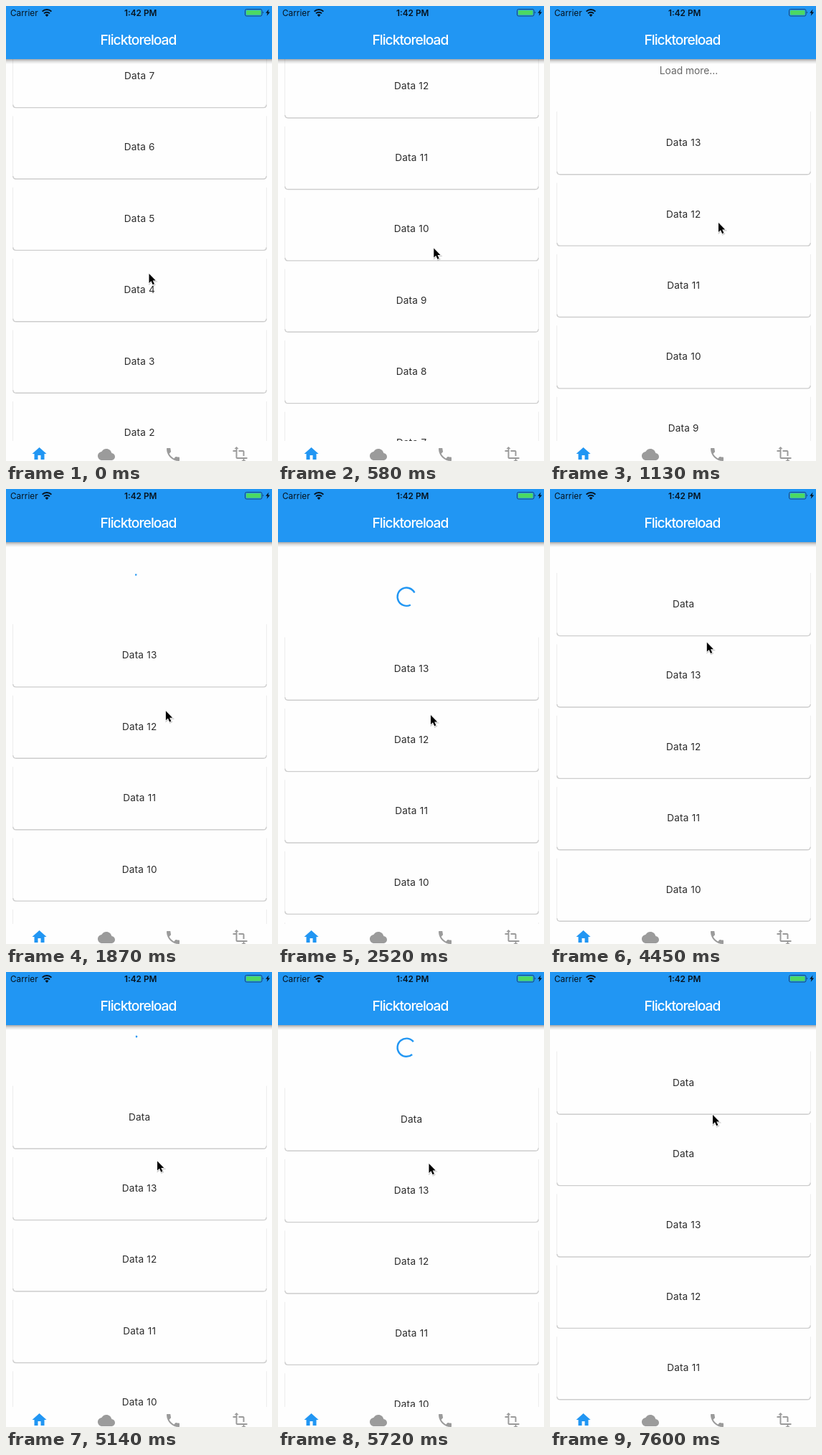
Write an HTML page that moves like this. It is 371 px wide and 634 px high and loops after 7.99 s.

```html
<!DOCTYPE html>
<html lang="en">
<head>
<meta charset="utf-8">
<title>List refresh</title>
<style>
  html, body { margin: 0; width: 100%; height: 100%; overflow: hidden; background: #fefefe; }
  svg { display: block; width: 100%; height: 100%; }
  text { font-family: Inter, Roboto, sans-serif; text-anchor: middle; }
  .row { font-size: 13.6px; letter-spacing: .2px; fill: #2c2c2c; }
  .side, .base { fill: none; stroke: #ececec; }
  .base { stroke: #cdcdcd; stroke-width: 1.4; }
</style>
</head>
<body>
<svg viewBox="0 0 371 634" xmlns="http://www.w3.org/2000/svg">
  <defs>
    <linearGradient id="shade" x2="0" y2="1">
      <stop offset="0" stop-color="#000" stop-opacity=".34"/>
      <stop offset=".45" stop-color="#000" stop-opacity=".13"/>
      <stop offset="1" stop-color="#000" stop-opacity="0"/>
    </linearGradient>
  </defs>
  <rect width="371" height="634" fill="#fefefe"/>
  <g id="list"></g>
  <text id="hint" x="193.5" font-size="13.8" fill="#666">Load more...</text>
  <path id="spinner" fill="none" stroke="#2196f3" stroke-width="2.4"/>

  <rect y="74" width="371" height="7" fill="url(#shade)"/>
  <rect width="371" height="74" fill="#2196f3"/>
  <text x="184.5" y="54" font-size="19.3" font-weight="500" letter-spacing="-1" fill="#fff">Flicktoreload</text>
  <g fill="#06131f">
    <text x="6" y="13.7" font-size="11.8" style="text-anchor:start">Carrier</text>
    <text x="187.7" y="13.7" font-size="11.8" font-weight="600">1:42 PM</text>
    <path d="M57 15l-2.4-2.6a3.4 3.4 0 0 1 4.8 0z"/>
    <path d="M53 10.4a5.6 5.6 0 0 1 8 0M50.6 7.6a9 9 0 0 1 12.8 0" fill="none" stroke="#06131f" stroke-width="2"/>
    <rect x="333.5" y="4.5" width="23.5" height="9.5" rx="2" fill="none" stroke="#1c4a70"/>
    <rect x="335" y="6" width="20.5" height="6.5" rx="1" fill="#4cd964"/>
    <path d="M358.5 7.5q1.5 1.5 0 3zM366.5 4.5l-4.3 5.3h2.5l-1 4 4.5-5.4h-2.6z"/>
  </g>

  <rect y="606" width="371" height="28" fill="#fefefe"/>
  <g fill="#9b9b9b">
    <path transform="translate(34.5 612)" fill="#2196f3" d="M10 20v-6h4v6h5v-8h3L12 3 2 12h3v8z"/>
    <path transform="translate(128 613)" d="M19.35 10.04C18.67 6.59 15.64 4 12 4 9.11 4 6.6 5.64 5.35 8.04 2.34 8.36 0 10.91 0 14c0 3.31 2.69 6 6 6h13c2.76 0 5-2.24 5-5 0-2.64-2.05-4.78-4.65-4.96z"/>
    <path transform="translate(221 613)" d="M6.62 10.79c1.44 2.83 3.76 5.14 6.59 6.59l2.2-2.2c.27-.27.67-.36 1.02-.24 1.12.37 2.33.57 3.57.57.55 0 1 .45 1 1V20c0 .55-.45 1-1 1-9.39 0-17-7.61-17-17 0-.55.45-1 1-1h3.5c.55 0 1 .45 1 1 0 1.25.2 2.45.57 3.57.11.35.03.74-.25 1.02z"/>
    <path transform="translate(314.5 613)" d="M22 18v-2H8V4h2L7 1 4 4h2v2H2v2h4v8c0 1.1.9 2 2 2h8v2h-2l3 3 3-3h-2v-2h4zM10 8h6v6h2V8c0-1.1-.9-2-2-2h-6v2z"/>
  </g>
  <g id="cursor">
    <path d="M0 0v13l3-2.7 2.2 5 2.2-1-2.2-4.7h4z" fill="none" stroke="#000" stroke-opacity=".2" stroke-width="2" transform="translate(.6 1)"/>
    <path d="M0 0v13l3-2.7 2.2 5 2.2-1-2.2-4.7h4z" stroke="#fff" stroke-width="1.4" paint-order="stroke"/>
  </g>
</svg>
<script>
const LOOP = 7990, PITCH = 99.4, CYCLE = 1333;
const STARTS = [1853, 5107], LOAD = 1510, CLOSE = 490, HEADER = 51;
const $ = id => document.getElementById(id);

// Smooth 0 to 1 between two times
function ramp(t, from, to) {
  const u = Math.min(1, Math.max(0, (t - from) / (to - from)));
  return u * u * (3 - 2 * u);
}

// Flick to the top, pull, spring back, second pull; the header closes after each load
function listTop(t) {
  const closed = STARTS.reduce((sum, s) => sum + ramp(t, s + LOAD, s + LOAD + CLOSE), 0);
  return -499.4 + 684 * ramp(t, 30, 850) + 65 * ramp(t, 850, 2420)
    - 45 * ramp(t, 2520, 3350) + HEADER * (ramp(t, 4210, 5300) - closed);
}

function pointer(t) {
  const a = ramp(t, 30, 1130), b = ramp(t, 1130, 2520), c = ramp(t, 2520, 3220);
  const d = ramp(t, 3220, 3880), e = ramp(t, 4210, 5300), f = ramp(t, 7400, 7600);
  return [
    199.5 + 35.5 * a - 22 * b - 6 * c + 13 * d - 9.5 * e + 16.5 * f,
    373 - 71 * a + 13 * b - 91 * c - 18 * d + 61 * e - 68 * f
  ];
}

// cubic-bezier(.4, 0, .2, 1)
function ease(x) {
  if (x <= 0) return 0;
  if (x >= 1) return 1;
  let lo = 0, hi = 1;
  for (let i = 0; i < 20; i++) {
    const s = (lo + hi) / 2, r = 1 - s;
    if (1.2 * r * r * s + .6 * r * s * s + s ** 3 < x) lo = s; else hi = s;
  }
  return lo * lo * (3 - 2 * lo);
}

function arc(age, cx, cy) {
  const step = Math.floor(age / CYCLE), p = age / CYCLE - step, r = 12.6;
  const head = ease(p * 2), tail = ease(p * 2 - 1);
  const a = Math.PI * (-.5 + 1.5 * tail + 1.7 * p - .8 * step);
  const sweep = Math.max(1.5 * Math.PI * (head - tail), .18);
  const at = k => `${cx + r * Math.cos(k)} ${cy + r * Math.sin(k)}`;
  return `M${at(a)}A${r} ${r} 0 ${sweep > Math.PI ? 1 : 0} 1 ${at(a + sweep)}`;
}

const rows = Array.from({ length: 15 }, () => {
  const g = document.createElementNS("http://www.w3.org/2000/svg", "g");
  g.innerHTML = `<path class="side" d="M9.6-43V41M363.4-43V41"/>
    <path class="base" d="M9.8 40.6q.2 4 4.2 4H359q4 0 4.2-4"/>
    <text class="row" x="186.2" y="5"></text>`;
  $("list").append(g);
  return { g, label: g.lastChild };
});

function draw(t) {
  const top = listTop(t);
  const added = STARTS.filter(s => t >= s + LOAD).length;
  const began = STARTS.find(s => t >= s && t < s + LOAD);
  rows.forEach(({ g, label }, i) => {
    const y = top + i * PITCH, n = 13 + added - i;
    g.style.display = y > 20 && y < 660 && n > 0 ? "" : "none";
    g.setAttribute("transform", `translate(0 ${y})`);
    label.textContent = i < added ? "Data" : "Data " + n;
  });
  $("hint").style.display = began ? "none" : "";
  $("hint").setAttribute("y", top - 95);
  $("spinner").setAttribute("d", began ? arc(t - began, 179.2, top - 99.4) : "");
  $("cursor").setAttribute("transform", `translate(${pointer(t)})`);
}

const start = performance.now();
function tick() {
  draw((performance.now() - start) % LOOP);
  requestAnimationFrame(tick);
}
tick();
</script>
</body>
</html>
```
